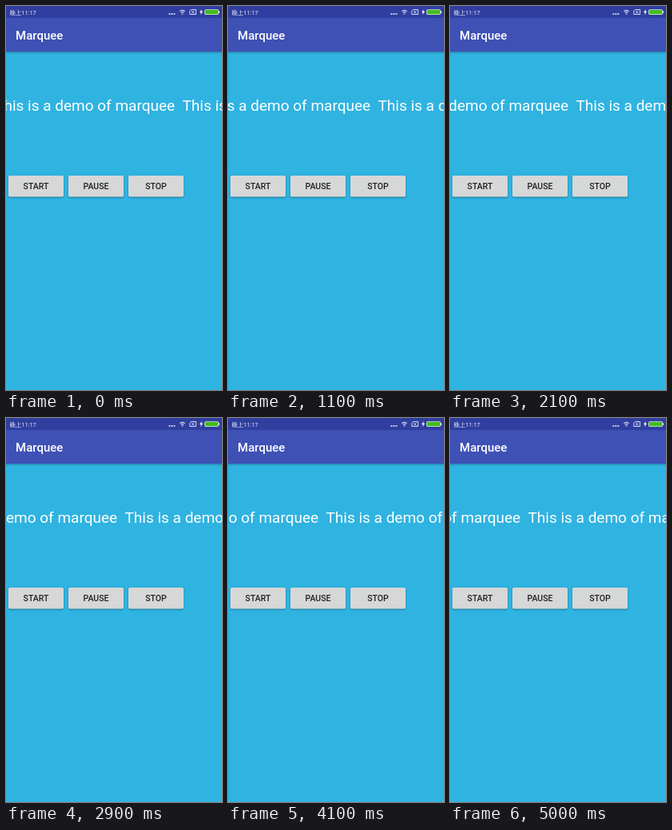
Write an HTML page with a canvas that moves like this. It is 270 px wide and 480 px high and loops after 5100 ms.

```html
<!DOCTYPE html>
<html lang="en">
<head>
<meta charset="utf-8">
<title>Marquee</title>
<style>
  html, body { margin: 0; width: 100%; height: 100%; overflow: hidden; background: #2fb3e1; }
  canvas { display: block; }
</style>
</head>
<body>
<canvas id="stage" width="270" height="480"></canvas>
<script>
const ctx = document.getElementById('stage').getContext('2d');
const LOOP = 5100, STEP = 100;
const MESSAGE = 'This is a demo of marquee  ';

// [time in ms, x of the text]; the marquee is paused on the level stretch
const PATH = [[0, 220.5], [700, 199.5], [1500, 175.5], [2100, 157.5], [2400, 148.5],
              [3230, 148.5], [3400, 143.5], [4100, 122.5], [5000, 97.5], [5100, 94.5]];

const BUTTONS = [
  { label: 'START', x: 3, press: 2950 },
  { label: 'PAUSE', x: 78, press: 2250 },
  { label: 'STOP', x: 153 }
];

function marqueeX(t) {
  const i = PATH.findIndex(p => p[0] > t);
  const [t0, x0] = PATH[i - 1], [t1, x1] = PATH[i];
  return x0 + (x1 - x0) * (t - t0) / (t1 - t0);
}

function rect(x, y, w, h, color) {
  ctx.fillStyle = color;
  ctx.fillRect(x, y, w, h);
}

function roundRect(x, y, w, h, r, color) {
  ctx.fillStyle = color;
  ctx.beginPath();
  ctx.roundRect(x, y, w, h, r);
  ctx.fill();
}

function text(str, x, y, font, color = '#fff', align = 'left') {
  ctx.font = font + ' Roboto, "Noto Sans CJK SC", "Noto Sans CJK", sans-serif';
  ctx.fillStyle = color;
  ctx.textAlign = align;
  ctx.fillText(str, x, y);
}

function stroke(path, width) {
  ctx.strokeStyle = '#e4e6f5';
  ctx.lineWidth = width;
  ctx.stroke(new Path2D(path));
}

function statusBar() {
  rect(0, 0, 270, 15, '#303f9f');
  text('晚上11:17', 4.5, 10.5, '7.4px', '#e4e6f5');
  for (const x of [203.5, 206.5, 209.5]) rect(x, 9, 1.8, 1.8, '#e4e6f5');
  stroke('M217.3 6.7Q220.5 4 223.7 6.7M218.6 8.4Q220.5 6.7 222.4 8.4', 1.1);
  stroke('M219.8 9.9H221.2', 1.4);
  stroke('M231.5 4.5H237.5V10.5H229.8V6.2Z', 0.9);
  stroke('M232 6L235.5 9.3M235.5 6L232 9.3', 0.9);
  ctx.fillStyle = '#fff';
  ctx.fill(new Path2D('M244.8 4L242 8H243.8L243 11.2L246.2 6.8H244.3Z'));
  roundRect(248, 4.2, 18, 6.8, 2, '#dfe9e0');
  roundRect(248.8, 5, 16.4, 5.2, 1.4, '#43bd20');
  rect(266, 6.3, 1, 2.6, '#dfe9e0');
}

function appBar() {
  rect(0, 15, 270, 42, '#3f51b5');
  const shade = ctx.createLinearGradient(0, 57, 0, 60);
  shade.addColorStop(0, 'rgba(0,0,0,.24)');
  shade.addColorStop(1, 'rgba(0,0,0,0)');
  rect(0, 57, 270, 3, shade);
  text('Marquee', 12, 42, '500 15px');
}

function button({ label, x, press }, t) {
  ctx.save();
  ctx.shadowColor = 'rgba(0,0,0,.35)';
  ctx.shadowBlur = 2;
  ctx.shadowOffsetY = 1;
  roundRect(x, 212, 69, 26.5, 1.5, '#d6d7d7');
  ctx.restore();
  const age = t - press;
  if (age >= 0 && age < 350) {
    const glow = Math.min(1, age / 100, (350 - age) / 200);
    roundRect(x, 212, 69, 26.5, 1.5, `rgba(0,0,0,${0.1 * glow})`);
  }
  text(label, x + 34.5, 229, '500 10.5px', '#212121', 'center');
}

function draw(now) {
  const t = Math.floor(now % LOOP / STEP) * STEP;
  rect(0, 0, 270, 480, '#2fb3e1');
  statusBar();
  appBar();
  const x = marqueeX(t);
  text(MESSAGE, x, 131, '19px');
  text(MESSAGE, x - ctx.measureText(MESSAGE).width, 131, '19px');
  BUTTONS.forEach(b => button(b, t));
}

const start = performance.now();
function tick() {
  draw(performance.now() - start);
  requestAnimationFrame(tick);
}
tick();
</script>
</body>
</html>
```
